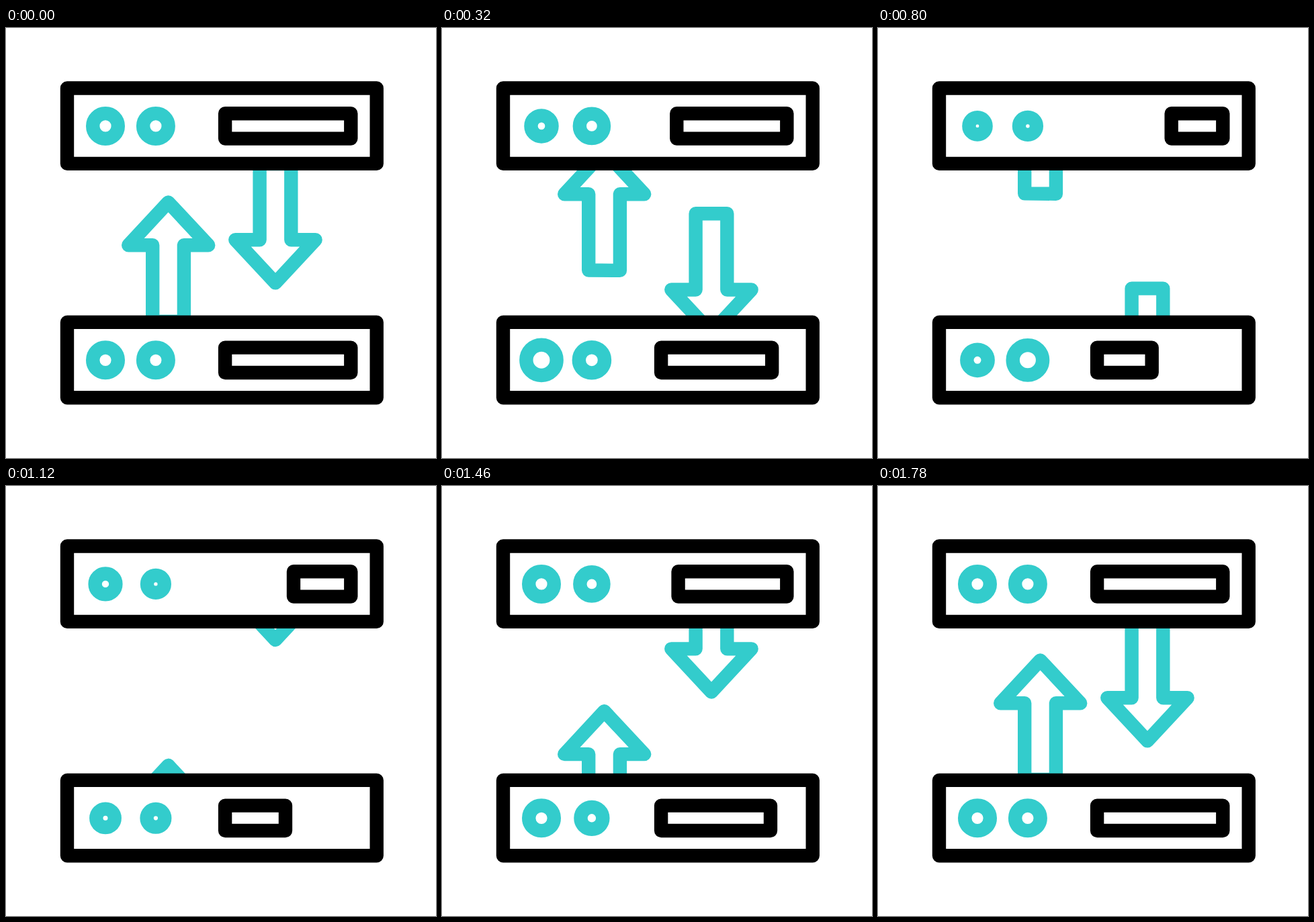
An HTML page that plays this animation: 640x640 px, repeating every 1820 ms.

```html
<!DOCTYPE html>
<html lang="en">
<head>
<meta charset="utf-8">
<title>Server transfer</title>
<style>
  html, body { margin: 0; width: 100%; height: 100%; overflow: hidden; background: #fff; }
  svg { display: block; width: 100%; height: 100%; }
  g { fill: none; stroke: #000; stroke-width: 20.4; stroke-linejoin: round; }
  path, circle { stroke: #3cc; }
</style>
</head>
<body>
<svg viewBox="0 0 640 640">
  <clipPath id="gap"><rect x="90" y="205" width="460" height="230"/></clipPath>
  <g clip-path="url(#gap)">
    <path id="up" d="M241.5 259.4L301.2 323.3H264.9V437L218.2 436.6V323.3H182.2Z"/>
    <path id="down" d="M401 379.4L341.3 315.2H377.6V202H424.3V315.2H460.6Z"/>
  </g>
  <g id="top">
    <rect x="91" y="89.5" width="460.7" height="112.4"/>
    <rect y="127.2" height="37.4"/>
    <circle cx="148" cy="145.9"/>
    <circle cx="222.9" cy="145.9"/>
  </g>
</svg>
<script>
const LOOP = 1820, STEP = 20, END = 1780, SWAP = 1010;
const REST = 18.8, LEFT = 326.1, RIGHT = 513.3;
const $ = id => document.getElementById(id);

// The lower server is a copy of the upper one.
const low = $('top').cloneNode(true);
low.id = 'low';
low.setAttribute('transform', 'translate(0 348.4)');
$('top').after(low);

// Smooth 0 to 1 between times a and b.
function ramp(t, a, b) {
  const p = Math.min(1, Math.max(0, (t - a) / (b - a)));
  return (1 - Math.cos(Math.PI * p)) / 2;
}

// Rises over a..b, stays, falls back over c..d.
const hold = (t, a, b, c, d) => ramp(t, a, b) - ramp(t, c, d);

// Grows, shrinks below zero and returns, one span for each move.
function swing(t, a, span, high, deep) {
  const b = a + span, c = b + span;
  return high * hold(t, a, b, b, c) - deep * hold(t, b, c, c, c + span);
}

// Steady travel out of one server, then in from the other, ending at home.
const travel = (t, out, back) => t <= SWAP ? out * t : back * (t - END);

function setArrow(id, dy) {
  $(id).setAttribute('transform', `translate(0 ${dy})`);
}

function setServer(id, x, width, ...swells) {
  const slot = $(id).querySelectorAll('rect')[1];
  slot.setAttribute('x', x);
  slot.setAttribute('width', width);
  $(id).querySelectorAll('circle').forEach((c, i) => c.setAttribute('r', REST + swells[i]));
}

function draw(t) {
  setArrow('up', travel(t, -0.2378, -0.237));
  setArrow('down', travel(t, 0.232, 0.2277));

  const squeeze = hold(t, 90, 855, 985, 1680);
  const topCut = 112 * squeeze, lowCut = 107 * squeeze;
  setServer('top', LEFT + topCut, RIGHT - LEFT - topCut,
    -6.2 * hold(t, 0, 620, 820, 1460),
    -6 * hold(t, 160, 870, 1080, 1620));
  setServer('low', LEFT, RIGHT - LEFT - lowCut,
    swing(t, 0, 487, 5.2, 6.4),
    swing(t, 240, 475, 4.2, 6));
}

const start = performance.now();
function tick() {
  const t = (performance.now() - start) % LOOP;
  draw(Math.min(END, Math.floor(t / STEP) * STEP));
  requestAnimationFrame(tick);
}
tick();
</script>
</body>
</html>
```
